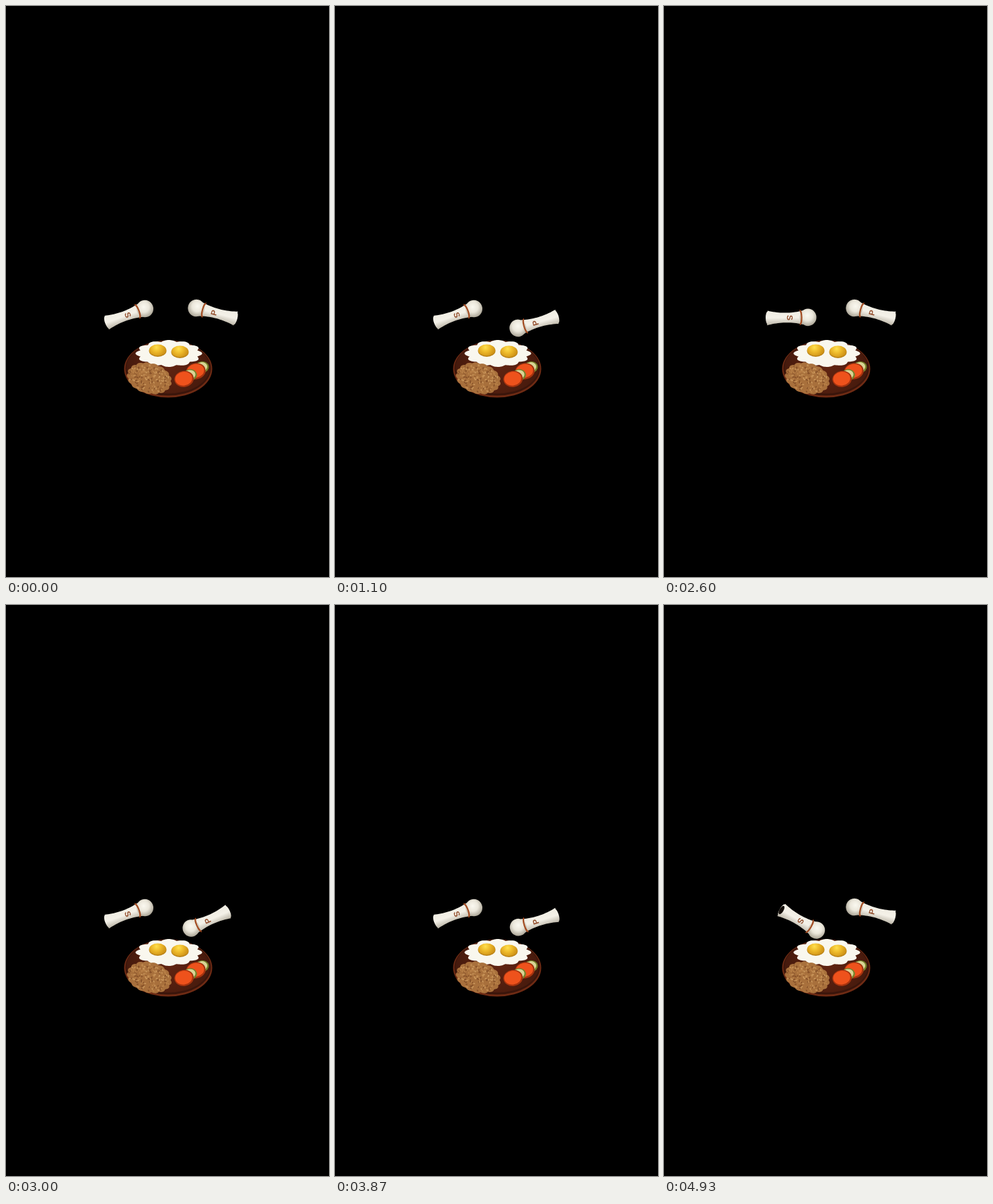
These frames come from a looping animation (480 by 848 pixels, 4960 ms). An HTML page with a canvas:

```html
<!DOCTYPE html>
<html lang="en">
<head>
<meta charset="utf-8">
<title>Breakfast</title>
<style>
html, body { margin: 0; width: 100%; height: 100%; overflow: hidden; background: #000; }
canvas { display: block; }
</style>
</head>
<body>
<canvas id="stage" width="480" height="848"></canvas>
<script>
const c = document.getElementById('stage').getContext('2d');
const LOOP = 4960, CYCLE = 2470, MOVE = 235, SHAKE = 420;

// Poses are [x, y, degrees] with the cap pointing right at 0.
const salt = {
  letter: 'S', start: 1600, shakes: 1.5, side: -1,
  rest: [183, 458, -20], high: [190, 458.5, 29], low: [205, 470.5, 30]
};
const pepper = {
  letter: 'P', start: 180, shakes: 2.5, side: 1,
  rest: [307, 455, 195], high: [302.5, 466, 138], low: [294.5, 472.5, 169]
};

const mix = (a, b, u) => a.map((v, i) => v + (b[i] - v) * u);
const smooth = u => u * u * (3 - 2 * u);

function pose(s, time) {
  let t = time - s.start;
  if (t >= CYCLE) t -= CYCLE;
  const back = MOVE + s.shakes * SHAKE;
  if (t <= 0 || t >= back + MOVE) return s.rest;
  if (t >= MOVE && t <= back) {
    return mix(s.high, s.low, (1 - Math.cos((t - MOVE) / SHAKE * 2 * Math.PI)) / 2);
  }
  // Both trips swing slightly outwards close to the resting place.
  const out = t < MOVE;
  const u = out ? t / MOVE : (back + MOVE - t) / MOVE;
  const p = mix(s.rest, out ? s.high : s.low, smooth(u));
  if (u < .5) p[0] += s.side * 5 * Math.sin(2 * Math.PI * u);
  return p;
}

function random(seed) {
  return () => (seed = seed * 16807 % 2147483647) / 2147483647;
}

function oval(x, y, rx, ry, fill, turn = 0) {
  c.beginPath();
  c.ellipse(x, y, rx, ry, turn, 0, 7);
  c.fillStyle = fill;
  c.fill();
}

// Oval with a frilled edge of n lobes.
function frilled(rx, ry, n, depth, fill) {
  c.beginPath();
  for (let a = 0; a < 2 * Math.PI; a += .03) {
    const r = 1 - depth + depth * Math.abs(Math.cos(n * a / 2));
    c.lineTo(rx * r * Math.cos(a), ry * r * Math.sin(a));
  }
  c.fillStyle = fill;
  c.fill();
}

function shaded(x, y, r, ...colors) {
  const g = c.createRadialGradient(x, y, 0, x, y, r);
  colors.forEach((color, i) => g.addColorStop(i / (colors.length - 1), color));
  return g;
}

function at(x, y, turn, paint) {
  c.save();
  c.translate(x, y);
  c.rotate(turn);
  paint();
  c.restore();
}

function eggs() {
  frilled(49.5, 20, 12, .12, '#f9f7ee');
  for (const x of [-16.5, 16.5]) {
    const y = -4 + x / 16.5;
    oval(x, y + 1, 13, 9, '#b98216');
    oval(x, y, 12.5, 8.5, shaded(x - 2, y - 4, 14, '#ffe04e', '#edb92a', '#d09418'));
  }
}

function patty() {
  frilled(34, 23, 17, .06, '#a8703c');
  const rnd = random(77);
  for (let i = 0; i < 190; i++) {
    const a = rnd() * 2 * Math.PI, r = Math.sqrt(rnd());
    oval(31 * r * Math.cos(a), 20 * r * Math.sin(a), 1.6, .9,
      ['#c9965c', '#855029', '#ba8249'][i % 3], rnd() * 3);
  }
}

// Cucumber and tomato take turns from the back to the front.
function slices() {
  for (let i = 0; i < 4; i++) {
    const x = 291 - i * 8.8, y = 536.5 + i * 5.8;
    const [r, edge, flesh] = i % 2 ? [14.5, '#a5330f', '#ee521c'] : [10.5, '#73842c', '#d9d596'];
    oval(x, y, r, r * .83, edge, -.15);
    oval(x - .5, y - .5, r - 1.8, r * .83 - 1.8, flesh, -.15);
  }
}

function plate() {
  oval(241, 539, 65.5, 42.5, '#6e2b14');
  oval(241, 538, 63.5, 40.5, '#3a150b');
  oval(241, 537, 62, 38.5, shaded(241, 530, 62, '#632612', '#551f0f', '#451a0d'));
  at(242, 516, 0, eggs);
  at(213, 553, .25, patty);
  slices();
}

function shaker(s, time) {
  const [x, y, deg] = pose(s, time);
  at(x, y, deg * Math.PI / 180, () => {
    const g = c.createLinearGradient(0, 11 * s.side, 0, -11 * s.side);
    g.addColorStop(0, '#efece2');
    g.addColorStop(.5, '#f4f1e8');
    g.addColorStop(1, '#b9b3a4');

    // Flared body, waisted in the middle.
    c.beginPath();
    for (const e of [-1, 1]) {
      for (let i = 0; i <= 20; i++) {
        const px = e * (i * 2.7 - 35) * -1 + (e > 0 ? -17 : 0);
        const u = (px + 8) / 27;
        c.lineTo(px, e * (7.3 + 3.4 * u * u));
      }
    }
    c.fillStyle = g;
    c.fill();
    oval(-35, 0, 3, 9.5, g);
    oval(25, 0, 12.5, 12.8, shaded(24, 3 * s.side, 16, '#faf8f0', '#ebe7db', '#a9a394'));

    c.beginPath();
    c.ellipse(12.5, 0, 3, 10.5, 0, -Math.PI / 2, Math.PI / 2);
    c.strokeStyle = '#a34c22';
    c.lineWidth = 2.2;
    c.stroke();

    // The open foot shows only while the salt is tipped over.
    if (s === salt && deg > 15) oval(-35, 0, 3, 7, '#120c08');

    c.rotate(Math.PI / 2);
    c.font = 'bold 12px "Liberation Sans", sans-serif';
    c.textAlign = 'center';
    c.textBaseline = 'middle';
    c.fillStyle = '#94502f';
    c.fillText(s.letter, 0, 3);
  });
}

function draw(now) {
  const time = now % LOOP;
  c.fillStyle = '#000';
  c.fillRect(0, 0, 480, 848);
  plate();
  shaker(salt, time);
  shaker(pepper, time);
  requestAnimationFrame(draw);
}
requestAnimationFrame(draw);
</script>
</body>
</html>
```
